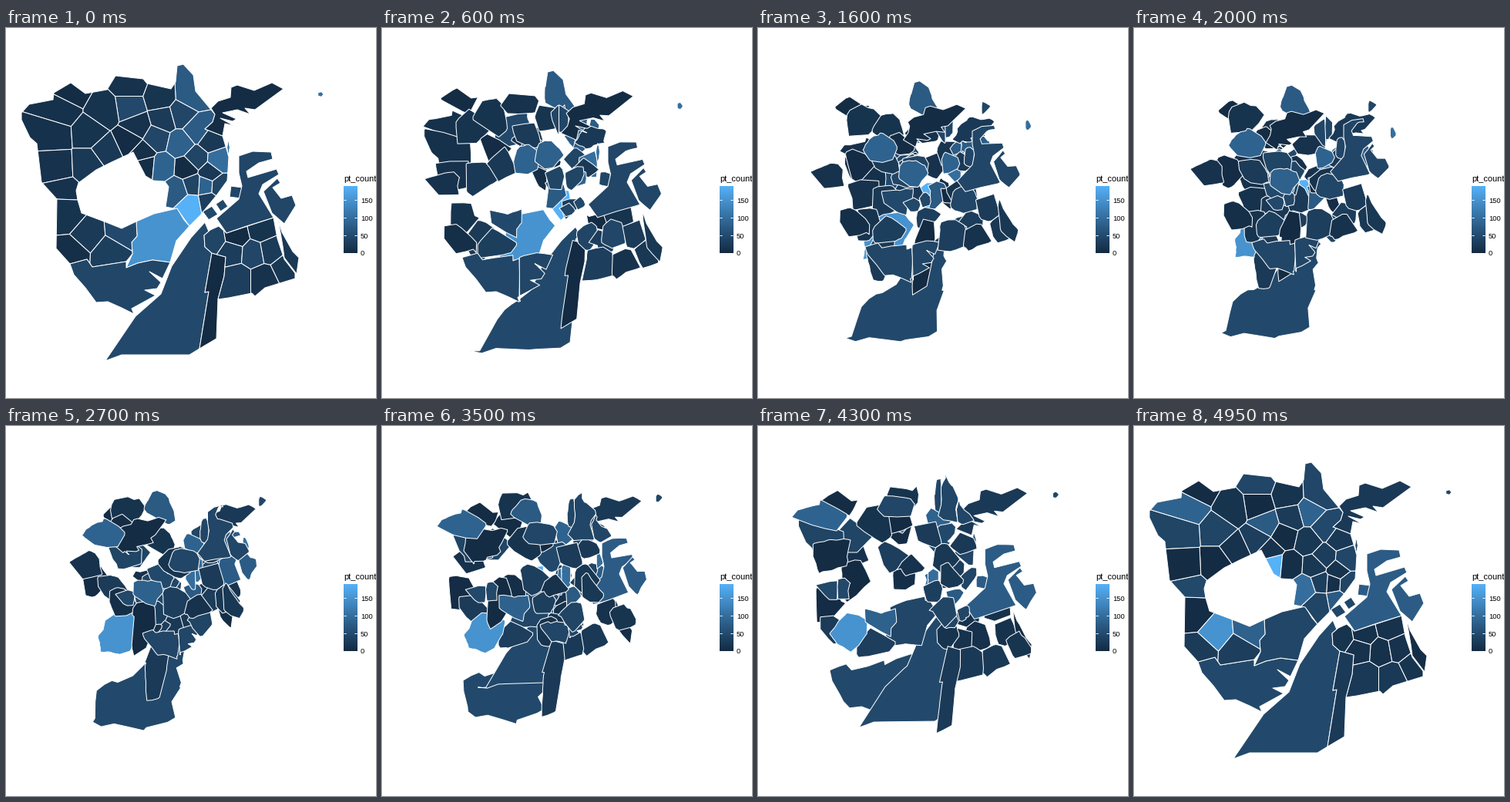
Animation, 480 px wide and 480 px high, one loop 5000 ms. Source, as a matplotlib script:

```python
import numpy as np
import matplotlib.pyplot as plt
from matplotlib.animation import FuncAnimation
from matplotlib.collections import PolyCollection

SIZE, FRAMES, STEP = 480, 100, 50
POINTS = 80
TOP_VALUE = 189

# ---------- colour scale, blended in Lab ----------
M = np.array([[.4124, .3576, .1805], [.2126, .7152, .0722], [.0193, .1192, .9505]])
WHITE = M.sum(axis=1)


def to_lab(code):
    c = np.array([int(code[i:i + 2], 16) for i in (1, 3, 5)]) / 255
    lin = np.where(c > .04045, ((c + .055) / 1.055) ** 2.4, c / 12.92)
    f = np.cbrt(M @ lin / WHITE)
    return np.array([116 * f[1] - 16, 500 * (f[0] - f[1]), 200 * (f[1] - f[2])])


def to_rgb(lab):
    fy = (lab[0] + 16) / 116
    f = np.array([fy + lab[1] / 500, fy, fy - lab[2] / 200])
    lin = np.clip(np.linalg.solve(M, f ** 3 * WHITE), 0, 1)
    return np.where(lin > .0031308, 1.055 * lin ** (1 / 2.4) - .055, 12.92 * lin)


LOW, HIGH = to_lab("#132B43"), to_lab("#56B1F7")


def shade(value):
    return to_rgb(LOW + (HIGH - LOW) * value / TOP_VALUE)


# ---------- geometry ----------
def clip(ring, normal, limit):
    """Part of the ring where normal . p <= limit."""
    out = []
    for a, b in zip(ring, np.roll(ring, -1, axis=0)):
        da, db = limit - normal @ a, limit - normal @ b
        if da >= 0:
            out.append(a)
        if da * db < 0:
            out.append(a + (b - a) * da / (da - db))
    return np.array(out)


def densify(ring):
    """Ring with a fixed winding, longest edges halved until it has POINTS vertices."""
    x, y = ring.T
    if x @ np.roll(y, -1) - y @ np.roll(x, -1) < 0:
        ring = ring[::-1]
    ring = list(ring)
    while len(ring) < POINTS:
        p = np.array(ring)
        k = int(np.argmax(np.hypot(*(np.roll(p, -1, axis=0) - p).T)))
        ring.insert(k + 1, (p[k] + p[(k + 1) % len(p)]) / 2)
    return np.array(ring)


def split(ring, n):
    """Cut a ring into n vertical slices."""
    right = np.array([1.0, 0.0])
    pieces = []
    for x in np.quantile(densify(ring)[:, 0], np.arange(1, n) / n):
        pieces.append(clip(ring, right, x))
        ring = clip(ring, -right, -x)
    return pieces + [ring]


def align(a, b):
    """Rotate the vertex order of b to the closest match with a."""
    turns = [np.roll(b, k, axis=0) for k in range(POINTS)]
    return min(turns, key=lambda r: ((r - a) ** 2).sum())


def blob(x, y, rx, ry, n=4, turn=0.0):
    a = turn + np.arange(n) * 2 * np.pi / n
    return np.c_[x + rx * np.cos(a), y + ry * np.sin(a)]


# ---------- map: each land is shared out to its nearest district centre ----------
parts, values, goals = {}, {}, {}


def land(outline, **districts):
    """Districts are given as name=(x, y, count, name of the place it travels to)."""
    centres = {k: np.array(d[:2], float) for k, d in districts.items()}
    for name, (_, _, value, goal) in districts.items():
        ring, c = np.array(outline, float), centres[name]
        for other, o in centres.items():
            if other != name:
                ring = clip(ring, o - c, (o @ o - c @ c) / 2)
        parts[name], values[name], goals[name] = [ring], value, goal


def extra(name, ring):
    parts[name].append(np.array(ring, float))
    parts[name].sort(key=lambda r: r[:, 0].mean())


# north and centre
land([(66, 222), (46, 200), (40, 150), (31, 142), (20, 119), (20, 110), (30, 99), (61, 93),
      (62, 84), (84, 71), (103, 85), (131, 80), (142, 62), (178, 66), (183, 72), (214, 79),
      (220, 70), (222, 49), (230, 47), (243, 61), (246, 82), (271, 112), (268, 122),
      (258, 131), (281, 140), (289, 167), (288, 184), (287, 198), (274, 216), (252, 243),
      (238, 257), (222, 235), (207, 232), (211, 206), (206, 199), (191, 198), (181, 192),
      (165, 161), (137, 174), (117, 184), (94, 201), (91, 211), (93, 223)],
     D18=(241, 230, 189, "D1"), A7=(160, 102, 46, "M1"), A1=(84, 82, 3, "D3"),
     A2=(72, 106, 9, "M5"), A3=(62, 139, 9, "M9"), A4=(108, 136, 14, "D5"),
     A5=(128, 107, 14, "D16"), A6=(160, 75, 12, "M6"), A8=(170, 128, 12, "M10"),
     A9=(160, 146, 2, "B4"), A10=(130, 160, 22, "M11"), B1=(64, 178, 12, "M8"),
     B2=(108, 176, 22, "M3"), B3=(72, 216, 12, "A10"), D1=(181, 178, 5, "M13"),
     D2=(177, 162, 8, "E3"), D3=(195, 143, 42, "C6"), D4=(240, 88, 72, "A8"),
     D5=(200, 90, 16, "M12"), D6=(205, 118, 25, "C3"), D7=(227, 112, 42, "D14"),
     D8=(248, 132, 75, "E1"), D11=(222, 210, 72, "E5"), D12=(267, 146, 22, "D20"),
     D13=(247, 170, 40, "E4"), D14=(276, 172, 100, "D11"), D15=(235, 182, 3, "A1"),
     D16=(264, 188, 22, "D12"), D17=(243, 203, 40, "A4"), E3=(258, 204, 85, "D7"),
     E4=(277, 205, 40, "A3"), E5=(262, 226, 30, "C4"), D10=(202, 180, 85, "A2"),
     D9=(226, 150, 82, "C2"))
extra("D14", blob(288.5, 155, 1.8, 11))
extra("D14", blob(408, 86, 4, 3.5, n=5))

# south-west
land([(169, 251), (192, 241), (222, 234), (231, 249), (238, 257), (221, 276), (213, 304),
      (190, 301), (171, 305), (156, 311), (164, 293), (163, 278), (170, 270)],
     C6=(200, 270, 150, "C1"))
land([(66, 222), (93, 223), (98, 240), (130, 252), (150, 260), (169, 251), (170, 270),
      (163, 278), (164, 293), (156, 303), (112, 310), (105, 300), (83, 306), (65, 286)],
     B4=(80, 245, 14, "M7"), C1=(105, 267, 24, "M2"), C2=(152, 263, 46, "D8"),
     C3=(84, 290, 6, "D10"), C4=(135, 292, 32, "D17"))

# islands to the south
land([(115, 429), (131, 431), (150, 424), (238, 424), (251, 416), (263, 342), (258, 343),
      (267, 292), (258, 284), (257, 269), (263, 264), (258, 252), (240, 272), (215, 309),
      (201, 345), (168, 374), (130, 430)],
     M1=(200, 370, 46, "C5"))
land([(251, 416), (263, 342), (258, 343), (267, 292), (285, 297), (283, 322), (275, 352),
      (273, 403)],
     M2=(267, 350, 0, "B2"))
land([(83, 306), (105, 300), (112, 310), (156, 303), (156, 311), (171, 305), (190, 301),
      (213, 304), (203, 325), (186, 316), (201, 330), (196, 338), (180, 340), (194, 347),
      (163, 364), (166, 371), (150, 363), (132, 355), (117, 356), (103, 337), (88, 320)],
     C5=(150, 335, 42, "E2"))

# south-east
land([(257, 269), (265, 262), (276, 257), (286, 266), (347, 246), (352, 273), (361, 300),
      (375, 318), (375, 325), (336, 337), (323, 348), (319, 344), (289, 350), (275, 352),
      (283, 322), (285, 297), (267, 292), (258, 284)],
     M5=(298, 270, 0, "A7"), M6=(332, 262, 14, "A5"), M7=(270, 275, 40, "D18"),
     M8=(292, 290, 28, "D13"), M3=(300, 325, 30, "A9"), M9=(321, 292, 42, "A6"),
     M10=(343, 288, 26, "D6"), M11=(335, 325, 12, "D2"), M12=(362, 312, 20, "D9"))
land([(353, 248), (358, 265), (372, 290), (380, 298), (377, 319), (361, 298), (359, 283)],
     M13=(367, 290, 20, "D15"))

# harbour
land([(302, 166), (320, 160), (344, 161), (346, 170), (328, 175), (312, 186), (314, 194),
      (351, 183), (354, 190), (333, 203), (328, 215), (347, 246), (312, 257), (286, 266),
      (273, 247), (302, 222), (306, 205), (302, 188)],
     E1=(305, 220, 42, "D4"))
extra("E1", [(334, 212), (352, 195), (356, 201), (346, 207), (357, 221), (371, 217),
             (376, 230), (361, 254), (345, 240)])
extra("E1", blob(298, 213, 10, 10, turn=.9))
land(blob(265, 240, 10, 9, turn=.2), E2=(265, 240, 45, "B3"))
extra("E2", blob(280, 230, 8, 8, turn=.2))
land([(258, 131), (268, 122), (271, 112), (266, 104), (275, 95), (291, 90), (292, 77),
      (300, 74), (322, 81), (345, 71), (360, 79), (323, 106), (310, 104), (317, 112),
      (300, 106), (281, 110), (299, 118), (294, 121), (278, 117), (296, 127), (284, 124),
      (281, 140)],
     D20=(305, 95, 3, "B1"))

# ---------- pair every outline with the one it becomes ----------
BACK, FRONT = ("D18", "M1"), ("D10", "D9")
order = sorted(parts, key=lambda n: (n in FRONT) - (n in BACK))

starts, ends, tints = [], [], []
whole = {0: ([], []), FRAMES - 1: ([], [])}
for name in order:
    tint = shade(values[name])
    source, target = parts[name], parts[goals[name]]
    for key, rings in ((0, source), (FRAMES - 1, target)):
        whole[key][0].extend(rings)
        whole[key][1].extend([tint] * len(rings))
    n = max(len(source), len(target))
    pair = [p if len(p) == n else split(p[0], n) for p in (source, target)]
    for a, b in zip(*pair):
        a = densify(a)
        starts.append(a)
        ends.append(align(a, densify(b)))
        tints.append(tint)
starts, ends = np.array(starts), np.array(ends)

# ---------- stage ----------
plt.rcParams["font.family"] = "Liberation Sans"
fig = plt.figure(figsize=(4.8, 4.8), dpi=100, facecolor="white")
ax = fig.add_axes([0, 0, 1, 1])
ax.axis("off")

shapes = PolyCollection([], edgecolors="white", linewidths=0.72)
ax.add_collection(shapes, autolim=False)


def label(x, y, text, px):
    ax.text(x, y, text, fontsize=px * .72, va="baseline")


# legend
LEFT, RIGHT, TOP, BOTTOM = 438, 455.3, 205.3, 291.7
label(LEFT, 199, "pt_count", 11)
ramp = np.array([[shade(v)] for v in np.linspace(TOP_VALUE, 0, 128)])
ax.imshow(ramp, extent=(LEFT, RIGHT, BOTTOM, TOP), aspect="auto", interpolation="nearest")
ax.set_xlim(0, SIZE)
ax.set_ylim(SIZE, 0)
for v in range(0, 200, 50):
    y = BOTTOM - v * (BOTTOM - TOP) / TOP_VALUE
    for x in (LEFT, RIGHT - 3.4):
        ax.plot([x, x + 3.4], [y, y], color="white", lw=0.72, solid_capstyle="butt")
    label(460, y + 3.7, str(v), 9.4)


def draw(i):
    if i in whole:
        rings, colors = whole[i]
    else:
        t = i / (FRAMES - 1)
        rings, colors = starts + (ends - starts) * t, tints
    shapes.set_verts(list(rings))
    shapes.set_facecolor(colors)
    return [shapes]


anim = FuncAnimation(fig, draw, frames=FRAMES, interval=STEP, repeat=True, repeat_delay=0)
plt.show()
```
